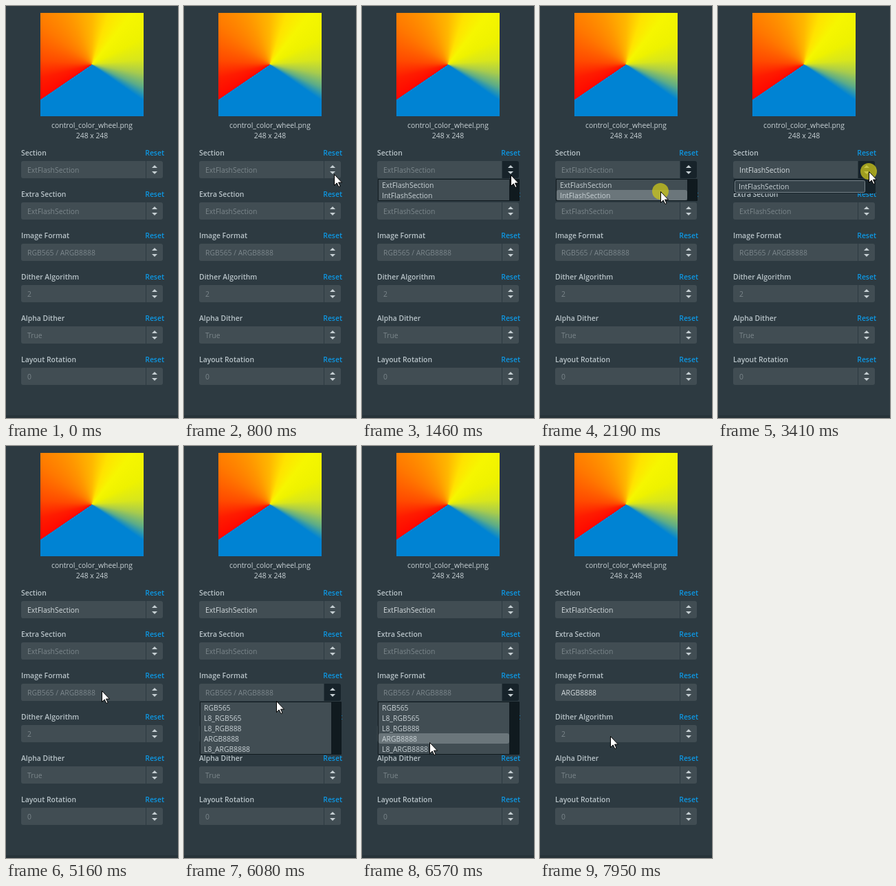
An HTML page that plays this animation: 250 px wide and 598 px high, repeating every 8 s.

```html
<!DOCTYPE html>
<html lang="en">
<head>
<meta charset="utf-8">
<title>Image settings</title>
<style>
  html, body { margin: 0; width: 100%; height: 100%; overflow: hidden; background: #2d3a41; }
  #wheel {
    position: absolute; left: 50px; top: 10px; width: 150px; height: 150px;
    background: conic-gradient(#ffb800 0deg, #ffe200 18deg, #f6f600 38deg, #eef200 62deg,
      #d8e61c 84deg, #a8cc4c 100deg, #5cac88 114deg, #0083d3 125deg, #0083d3 235.6deg,
      #ff0800 236deg, #ff1c00 255deg, #ff4a00 275deg, #ff7800 308deg, #ff9600 335deg, #ffb800 360deg);
  }
  svg { position: absolute; left: 0; top: 0; }
  text { font: 10.4px "Open Sans", "Noto Sans", sans-serif; fill: #c8d1d5; }
  .label { font-weight: 600; fill: #b9c4c9; }
  .reset { font-weight: 600; fill: #0d98e4; text-anchor: end; }
  .title { text-anchor: middle; }
  .value { fill: #7b868b; }
  .value.set { fill: #d3dadd; }
  .box { fill: #414d53; }
  .button.open { fill: #17232a; }
  .arrow { fill: #c6cfd3; }
</style>
</head>
<body>
<div id="wheel"></div>
<svg id="stage" width="250" height="598" viewBox="0 0 250 598"></svg>
<script>
const LOOP = 8000;
const ROW = 15;
const stage = document.getElementById('stage');

function add(parent, tag, attrs, text) {
  const el = document.createElementNS('http://www.w3.org/2000/svg', tag);
  for (const key in attrs) el.setAttribute(key, attrs[key]);
  if (text) el.textContent = text;
  parent.appendChild(el);
  return el;
}

function show(el, on) {
  el.setAttribute('visibility', on ? 'visible' : 'hidden');
}

function makeField(label, value, y) {
  add(stage, 'text', { class: 'label', x: 22, y: y - 8 }, label);
  add(stage, 'text', { class: 'reset', x: 230, y: y - 8 }, 'Reset');
  add(stage, 'path', { class: 'box', d: `M203 ${y}H25q-3 0-3 3v19q0 3 3 3H203z` });
  const button = add(stage, 'path', { class: 'box button', d: `M204 ${y}h21q3 0 3 3v19q0 3-3 3h-21z` });
  add(stage, 'path', { class: 'arrow', d: `M212 ${y + 10}l4-4 4 4zM212 ${y + 15}l4 4 4-4z` });
  const text = add(stage, 'text', { class: 'value', x: 31, y: y + 17 }, value);
  return { button, text, value, y };
}

function makePopup(field, items) {
  const top = field.y + 26;
  const height = items.length * ROW + 2;
  const group = add(stage, 'g', {});
  add(group, 'rect', { x: 23, y: top, width: 206, height, rx: 1, fill: '#101a1f' });
  add(group, 'rect', { x: 24, y: top + 1, width: 190, height: height - 2, fill: '#414d53' });
  const hover = add(group, 'rect', { x: 24, y: top, width: 190, height: ROW, rx: 3, fill: '#6b767b' });
  items.forEach((name, i) => add(group, 'text', { x: 29, y: top + 13 + i * ROW }, name));
  return { group, hover, top, count: items.length };
}

add(stage, 'rect', { x: 0, y: 594, width: 250, height: 4, fill: '#273339' });
add(stage, 'text', { class: 'title', x: 125, y: 177 }, 'control_color_wheel.png');
add(stage, 'text', { class: 'title', x: 125, y: 192 }, '248 x 248');

const fields = [
  ['Section', 'ExtFlashSection'],
  ['Extra Section', 'ExtFlashSection'],
  ['Image Format', 'RGB565 / ARGB8888'],
  ['Dither Algorithm', '2'],
  ['Alpha Dither', 'True'],
  ['Layout Rotation', '0']
].map(([label, value], i) => makeField(label, value, 225 + i * 60));

const section = fields[0], format = fields[2];

// spans: [button pressed, list open, closed]; picks: [time, chosen value]
const combos = [
  {
    field: section,
    popup: makePopup(section, ['ExtFlashSection', 'IntFlashSection']),
    spans: [[1030, 1080, 2380], [3370, 3440, 4240]],
    picks: [[2380, 'IntFlashSection'], [4240, 'ExtFlashSection']]
  },
  {
    field: format,
    popup: makePopup(format, ['RGB565', 'L8_RGB565', 'L8_RGB888', 'ARGB8888', 'L8_ARGB8888']),
    spans: [[5770, 5820, 7030]],
    picks: [[7030, 'ARGB8888']]
  }
];

// Briefly shown while the list unfolds
const unfolding = add(stage, 'g', {});
add(unfolding, 'rect', { x: 23, y: 251, width: 206, height: 21, fill: '#17232a' });
add(unfolding, 'rect', { x: 24.5, y: 253.5, width: 189, height: 17, rx: 2, fill: '#354249', stroke: '#77838a' });
add(unfolding, 'text', { x: 30, y: 266 }, 'IntFlashSection');

const halo = add(stage, 'circle', { r: 12, fill: '#c6c21c', 'fill-opacity': .78 });
const cursor = add(stage, 'path', {
  d: 'M.5.5v16l3.7-3.6 2.7 5.6 2.2-1-2.6-5.4h5z',
  fill: '#fff', stroke: '#000', 'stroke-width': 1
});

// [time, x, y]
const path = [
  [280, 245, 245], [800, 218, 244], [1420, 218, 244], [1460, 216, 245],
  [1960, 175, 269], [2810, 175, 269], [3250, 219, 240], [3500, 219, 240],
  [3640, 203, 245], [3900, 180, 261], [4380, 180, 261], [4650, 148, 342],
  [4840, 148, 342], [5160, 139, 355], [5930, 139, 355], [6080, 134, 370],
  [6520, 99, 431], [6569, 99, 431], [6570, 98, 430], [7730, 98, 430], [7950, 102, 421]
];
const clicks = [[980, 1130], [2190, 2420], [3330, 3490], [4100, 4280], [5720, 5890], [6930, 7080]];
const within = (t, from, to) => t >= from && t < to;

function pointer(t) {
  const i = path.findIndex(key => key[0] > t);
  if (i === 0) return path[0].slice(1);
  if (i < 0) return path[path.length - 1].slice(1);
  const [t0, x0, y0] = path[i - 1], [t1, x1, y1] = path[i];
  const k = (t - t0) / (t1 - t0);
  return [Math.round(x0 + (x1 - x0) * k), Math.round(y0 + (y1 - y0) * k)];
}

function drawCombo({ field, popup, spans, picks }, t, x, y) {
  const pick = picks.filter(p => t >= p[0]).pop();
  field.text.textContent = pick ? pick[1] : field.value;
  field.text.classList.toggle('set', !!pick);
  field.button.classList.toggle('open', spans.some(s => within(t, s[0], s[2])));

  const open = spans.some(s => within(t, s[1], s[2]));
  const row = Math.floor((y - popup.top - 1) / ROW);
  show(popup.group, open);
  show(popup.hover, open && x < 214 && row >= 0 && row < popup.count);
  popup.hover.setAttribute('y', popup.top + 1 + row * ROW);
}

function draw(t) {
  const [x, y] = pointer(t);
  combos.forEach(combo => drawCombo(combo, t, x, y));
  show(unfolding, within(t, 3410, 3440));
  show(halo, clicks.some(c => within(t, ...c)));
  halo.setAttribute('cx', x);
  halo.setAttribute('cy', y);
  show(cursor, t >= 280);
  cursor.setAttribute('transform', `translate(${x} ${y})`);
}

const start = performance.now();
function tick() {
  draw((performance.now() - start) % LOOP);
  requestAnimationFrame(tick);
}
tick();
</script>
</body>
</html>
```
